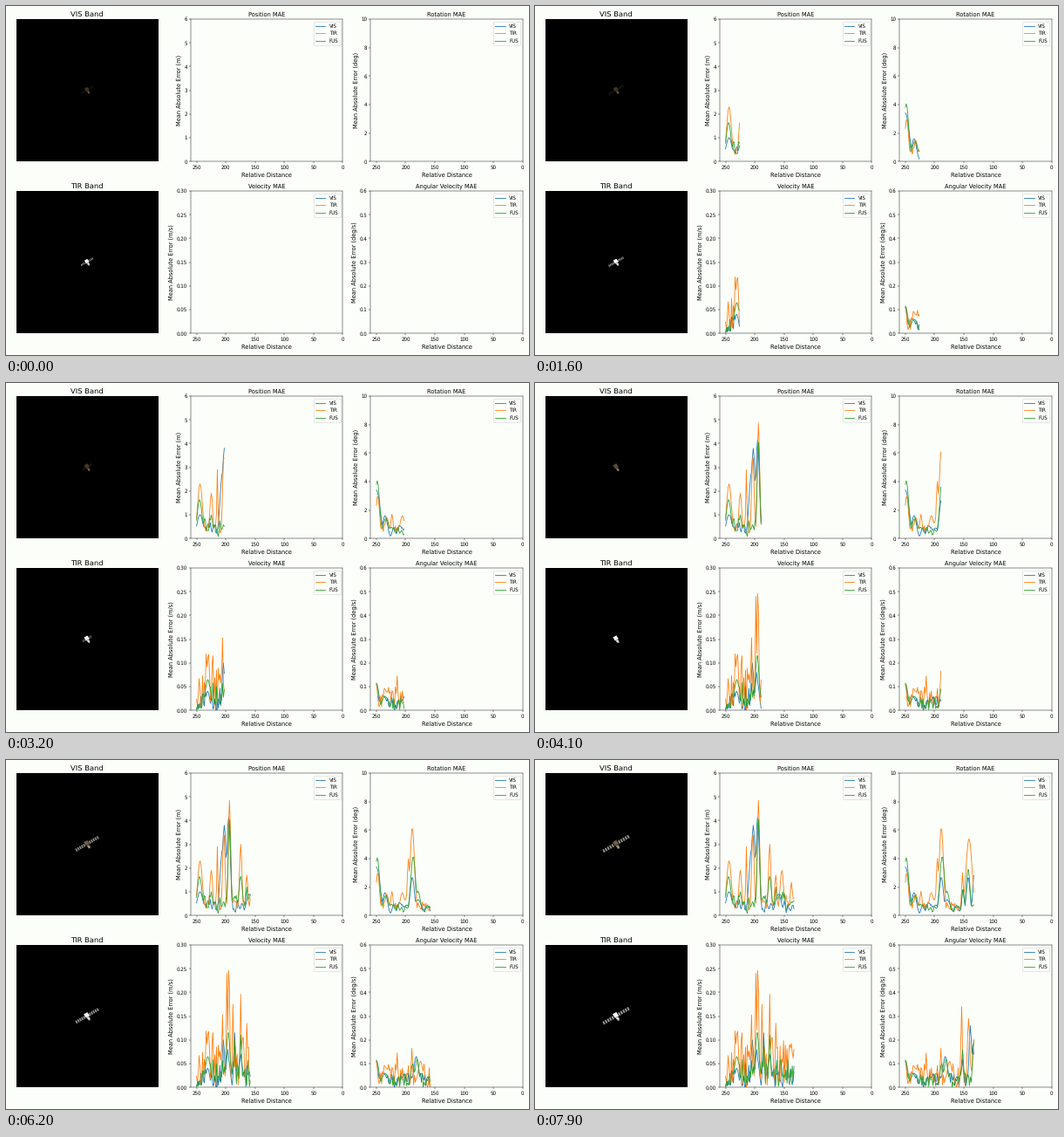
Animation, 600 px wide and 400 px high, one loop 8 s. Source, as a matplotlib script:

```python
import numpy as np
import matplotlib.pyplot as plt
from matplotlib.animation import FuncAnimation
from matplotlib.collections import PolyCollection

W, H, DPI = 600, 400, 40
FRAMES, INTERVAL = 80, 100
SIDE = 163.2
BG = "#fcfefa"
COLORS = {"VIS": "#1f77b4", "TIR": "#ff7f0e", "FUS": "#2ca02c"}

plt.rcParams.update({
    "font.family": "DejaVu Sans",
    "text.hinting": "none",
    "figure.facecolor": BG,
    "axes.facecolor": BG,
})

fig = plt.figure(figsize=(W / DPI, H / DPI), dpi=DPI)
steps = np.arange(FRAMES)
dist = 250 - 1.48 * steps
rng = np.random.default_rng(4)
curves = []


def add_axes(x, y, width):
    return fig.add_axes([x / W, 1 - (y + SIDE) / H, width / W, SIDE / H])


def image(y, title):
    ax = add_axes(11.7, y, SIDE)
    ax.set(xlim=(11.7, 11.7 + SIDE), ylim=(y + SIDE, y), xticks=[], yticks=[])
    ax.set_facecolor("black")
    ax.spines[:].set_visible(False)
    ax.set_title(title, fontsize=15)
    parts = PolyCollection([], linewidths=0)
    ax.add_collection(parts)
    return parts


def trace(peaks, floor, smooth):
    """Bell-shaped peaks (step, height, width) rising out of a noise floor."""
    noise = rng.random(FRAMES + smooth - 1)
    noise = np.convolve(noise, np.ones(smooth) / smooth, "valid")
    noise *= floor * np.clip(0.2 + steps / 12, 0, 1)
    bells = [h * np.exp(-((steps - c) / w) ** 2) for c, h, w in peaks]
    return np.max(bells + [noise], axis=0)


def chart(x, y, title, unit, top, tick, smooth, **series):
    ax = add_axes(x, y, 174.5)
    ax.set(xlim=(260, 0), ylim=(0, top), xticks=range(250, -1, -50),
           yticks=np.arange(0, top + tick / 2, tick))
    ax.set_title(title, fontsize=12)
    ax.set_xlabel("Relative Distance", fontsize=12)
    ax.set_ylabel(f"Mean Absolute Error ({unit})", fontsize=12)
    for name, (floor, *peaks) in series.items():
        line, = ax.plot([], [], color=COLORS[name], lw=1.5, label=name)
        curves.append((line, trace(peaks, floor, smooth)))
    ax.legend(loc="upper right")


LEFT, RIGHT, UPPER, LOWER = 211.9, 418.2, 15, 212

vis_img = image(UPPER, "VIS Band")
tir_img = image(LOWER, "TIR Band")

# Each series: noise floor, then its main peaks.
chart(LEFT, UPPER, "Position MAE", "m", 6, 1, 2,
      VIS=(0.7, (4, 1, 5), (30, 2.8, 4), (32, 3.8, 3), (37, 4.15, 3),
           (61, 0.9, 5)),
      TIR=(1.0, (4, 2.3, 4), (17, 1.9, 2.5), (24, 2.9, 1), (31.5, 3.6, 2),
           (38, 4.85, 2), (51, 3, 2), (58, 1.7, 2), (65, 1.9, 3),
           (76, 1.4, 2)),
      FUS=(1.0, (3.5, 1.65, 4), (17, 1, 2), (38, 4.05, 2.2), (51, 1.65, 3),
           (58, 1.2, 1.5), (66, 1, 1.5)))

chart(RIGHT, UPPER, "Rotation MAE", "deg", 10, 2, 3,
      VIS=(1.0, (0, 3.4, 6), (10, 1.6, 4), (41.5, 2.7, 3.5), (48, 1.1, 6),
           (66.5, 1.9, 2), (72.5, 2.7, 3), (79, 2.8, 2)),
      TIR=(1.6, (1.5, 3, 3), (12, 1.5, 3), (18, 1.7, 2), (30, 1.6, 4),
           (37, 4, 2), (41.5, 6.2, 3.5), (66, 3, 1.5), (73.5, 5.4, 5)),
      FUS=(1.0, (1, 4.05, 4), (11, 1.4, 5), (42.5, 4.15, 4), (48, 1.7, 4),
           (66.5, 1.9, 2), (72.5, 3.3, 3)))

chart(LEFT, LOWER, "Velocity MAE", "m/s", 0.3, 0.05, 1,
      VIS=(0.05, (13, 0.04, 3), (31, 0.1, 2), (36, 0.08, 2),
           (44, 0.115, 1.5), (51, 0.07, 2)),
      TIR=(0.12, (3, 0.067, 1), (13, 0.113, 2), (30, 0.153, 1),
           (35, 0.24, 1), (37.3, 0.256, 1.5), (42, 0.175, 1),
           (51, 0.196, 1), (58, 0.135, 1)),
      FUS=(0.06, (13, 0.065, 4), (36.5, 0.118, 3), (44, 0.1, 1),
           (51, 0.11, 1.5)))

chart(RIGHT, LOWER, "Angular Velocity MAE", "deg/s", 0.6, 0.1, 1,
      VIS=(0.06, (0, 0.11, 3), (8, 0.06, 6), (46, 0.13, 4),
           (66, 0.12, 1.5), (75, 0.26, 2), (78, 0.18, 2)),
      TIR=(0.1, (0, 0.11, 2), (10, 0.09, 3), (24, 0.145, 1.2),
           (41, 0.165, 1.2), (51, 0.11, 4), (65, 0.34, 1.3),
           (73, 0.29, 2), (79, 0.19, 2)),
      FUS=(0.06, (0, 0.115, 4), (10, 0.06, 5), (42, 0.1, 3),
           (47, 0.12, 3), (66, 0.16, 1.5), (79, 0.2, 2)))


def mix(a, b, t):
    return np.array(a) * (1 - t) + np.array(b) * t


def quad(center, along, across):
    c, a, b = map(np.asarray, (center, along, across))
    return np.array([c - a - b, c + a - b, c + a + b, c - a + b])


def satellite(n, cy):
    """Ten panel cells followed by three body pieces."""
    t = n / (FRAMES - 1)
    edge_on = np.exp(-((n - 40) / 11) ** 2)
    span = (7 + 8 * t) * (1 - 0.85 * edge_on)
    mid = np.array([93, cy])
    arm = span * np.array([1, -0.58])
    across = mix((0.4, 1.0), (0.9, 1.7), t)
    cells = [quad(mid + s * arm * (0.25 + 0.17 * k), arm * 0.055, across)
             for s in (-1, 1) for k in range(5)]
    body = [quad((-0.4, -0.8), (1.3, 2.0), (2.0, -1.1)),
            quad((1.6, 2.6), (0.8, 1.0), (1.2, -0.6)),
            quad((2.4, 4.0), (1.0, -0.2), (0.2, 1.0))]
    return cells + [mid + p * (0.85 + 0.25 * t) for p in body], edge_on


def paint(parts, n, cy, panel, body):
    verts, edge_on = satellite(n, cy)
    parts.set_verts(verts)
    parts.set_facecolor([panel * (1 - 0.4 * edge_on)] * 10 + body)


def update(n):
    for line, y in curves:
        line.set_data(dist[:n + 1], y[:n + 1])

    lit = np.clip((n - 25) / 30, 0, 1)
    lit = lit * lit * (3 - 2 * lit)
    panel = mix((0.12, 0.1, 0.07), (0.58, 0.57, 0.53), lit)
    tan = mix((0.36, 0.29, 0.18), (0.58, 0.52, 0.4), lit)
    paint(vis_img, n, 96, panel, [tan * 0.7, tan, tan * 1.25])
    paint(tir_img, n, 293.2, np.full(3, 0.6),
          [np.ones(3), np.full(3, 0.95), np.full(3, 0.75)])
    return []


anim = FuncAnimation(fig, update, frames=FRAMES, interval=INTERVAL,
                     init_func=lambda: update(0), repeat=True, repeat_delay=0)
plt.show()
```
